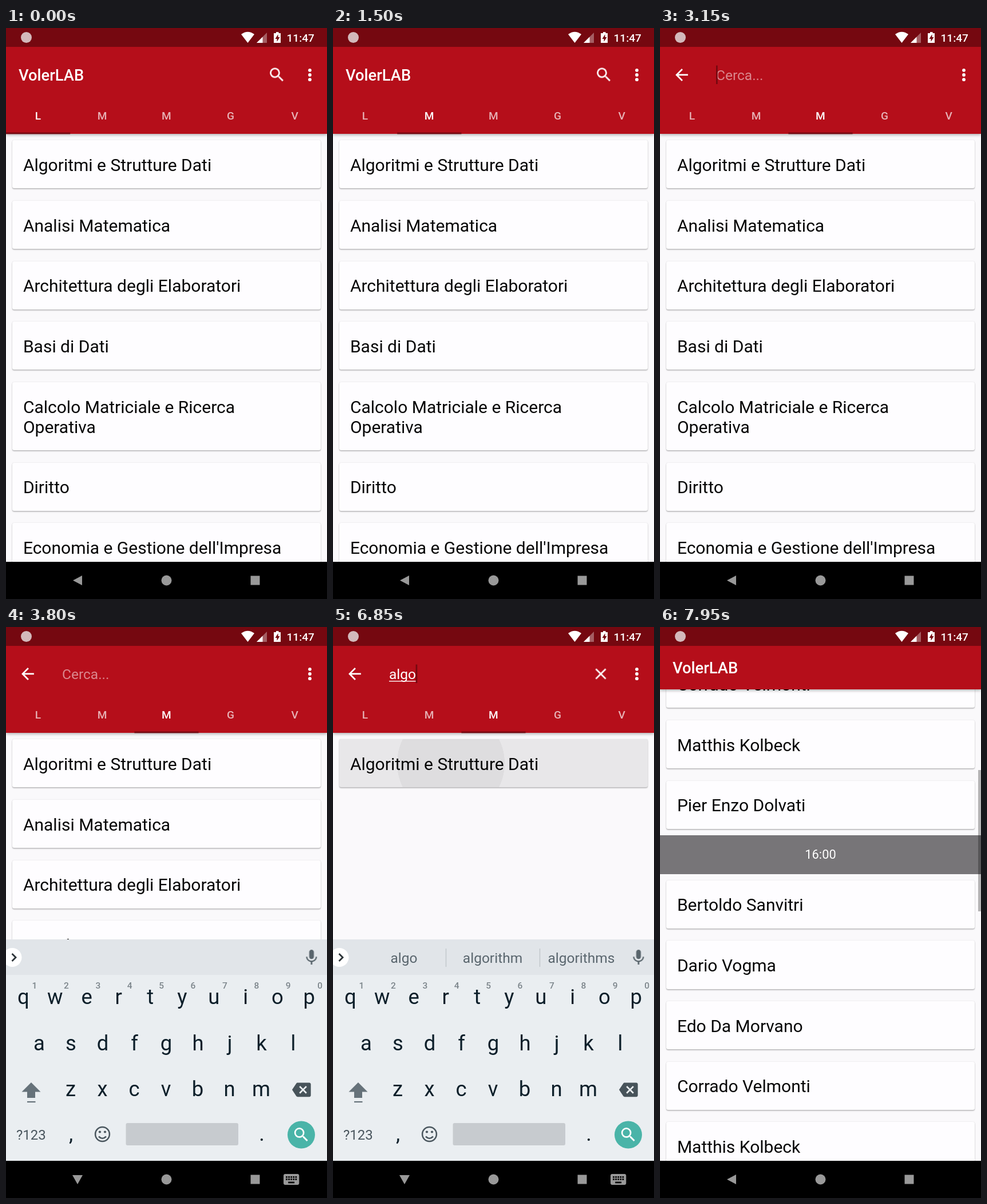
Animation, 561 px wide and 998 px high, one loop 8 s. Source, as an HTML page:

```html
<!DOCTYPE html>
<html lang="it">
<head>
<meta charset="utf-8">
<title>Ricevimento</title>
<style>
html, body { margin: 0; width: 100%; height: 100%; overflow: hidden; background: #faf9fb; }
#stage { position: relative; width: 561px; height: 998px; overflow: hidden; font-family: Roboto, sans-serif; }
#stage > *, .layer { position: absolute; left: 0; top: 0; }
svg { display: block; }
.view { overflow: hidden; width: 561px; background: #faf9fb; }
.mid { text-anchor: middle; }
.med { font-weight: 500; }

.card {
  position: relative; box-sizing: border-box; width: 539.2px; margin: 0 0 21.6px 10.9px;
  padding: 25.7px 19px 23.2px; border-radius: 3px; background: #fefdff; color: #060606;
  font-size: 30px; line-height: 35.2px; white-space: pre;
  box-shadow: 0 1.6px 2px rgba(0,0,0,.27), 0 0 1.6px rgba(0,0,0,.16);
}
.band {
  height: 68.2px; margin-bottom: 10.9px; background: #777578; color: #fff;
  font-size: 21.8px; line-height: 68.2px; text-align: center;
}

#home { top: 185px !important; height: 748px; }
#pager { width: 1683px; display: flex; --to: -561px; animation: page 8s infinite; }
.page { width: 561px; padding-top: 11.2px; }
#mark { --to: 112.2px; animation: page 8s infinite; }
@keyframes page {
  0%, 10.625% { transform: none; animation-timing-function: cubic-bezier(.35,.2,.2,1); }
  18.75%, 23.125% { transform: translateX(var(--to)); animation-timing-function: cubic-bezier(.35,.2,.2,1); }
  30%, 100% { transform: translateX(calc(var(--to) * 2)); }
}

/* filtering on the third page */
.page:last-child .card { animation: drop 8s linear infinite; }
.page:last-child .card:nth-child(1) { animation: none; }
.page:last-child .card:nth-child(2) { animation: ghost 8s linear infinite; }
.page:last-child .card:nth-child(5) { animation: ghost 8s linear infinite, rise 8s infinite; }
@keyframes drop { 0%, 56.25% { opacity: 1; } 57.5%, 100% { opacity: 0; } }
@keyframes ghost {
  0%, 58.75% { opacity: 1; }
  60.625%, 85.6% { opacity: .045; }
  85.625%, 100% { opacity: 0; }
}
@keyframes rise { 0%, 56.875% { transform: none; } 58.75%, 100% { transform: translateY(-211.4px); } }

.press { width: 100%; height: 100%; overflow: hidden; border-radius: 3px; background: rgba(0,0,0,.085); }
.press i {
  position: absolute; left: 101px; top: -52px; width: 188px; height: 188px; border-radius: 50%;
  background: rgba(0,0,0,.048); animation: ripple 8s step-end infinite;
}
@keyframes ripple {
  0% { transform: scale(0); }
  80% { transform: scale(.35); }
  83.125% { transform: scale(.64); }
  85.625% { transform: none; }
  86.25% { transform: scale(1.6); }
  86.875%, 100% { transform: scale(2.6); }
}

#keys { top: 546px !important; }
#board { animation: board 8s infinite; }
@keyframes board {
  0%, 43.125% { transform: translateY(260px); opacity: 0; animation-timing-function: ease-out; }
  45%, 85.75% { transform: none; opacity: 1; animation-timing-function: ease-in; }
  87.5%, 100% { transform: translateY(260px); opacity: 0; }
}

#detail { top: 33px !important; height: 900px; animation: open 8s infinite; }
@keyframes open {
  0%, 86% { transform: translateY(70px); opacity: 0; animation-timing-function: ease-out; }
  88.125%, 100% { transform: none; opacity: 1; }
}
#slots { top: 76.2px; width: 561px; animation: scroll 8s linear infinite; }
@keyframes scroll {
  0%, 94.9% { transform: none; }
  95% { transform: translateY(-17px); animation-timing-function: cubic-bezier(.4,.25,.6,.9); }
  99.375%, 100% { transform: translateY(-448px); }
}
#thumb {
  left: 555.5px; width: 5.5px; background: rgba(0,0,0,.28);
  animation: thumb 8s linear infinite;
}
@keyframes thumb {
  0%, 94.9% { top: 81px; height: 0; }
  95% { top: 81px; height: 258px; animation-timing-function: cubic-bezier(.4,.25,.6,.9); }
  99.375%, 100% { top: 217px; height: 247px; }
}
.bar { background: #b50e1a; width: 561px; box-shadow: 0 2px 5px rgba(0,0,0,.3); }
</style>
</head>
<body>
<div id="stage">
  <div id="home" class="view"><div id="pager"></div></div>

  <div class="bar" style="top:33px;height:152.4px"></div>
  <svg id="head" width="561" height="186" fill="#fff">
    <defs>
      <path id="find" d="M15.5 14h-.79l-.28-.27A6.47 6.47 0 0 0 16 9.5 6.5 6.5 0 1 0 9.5 16c1.61 0 3.09-.59 4.23-1.57l.27.28v.79l5 4.99L20.49 19l-4.99-5zm-6 0C7.01 14 5 11.99 5 9.5S7.01 5 9.5 5 14 7.01 14 9.5 11.99 14 9.5 14z"/>
    </defs>
    <g data-on="0 3150">
      <text class="med" x="22" y="92.3" font-size="27.3">VolerLAB</text>
      <use href="#find" transform="translate(457 65.4) scale(1.364)"/>
    </g>
    <g data-on="3150 8000">
      <path transform="translate(21.6 65.6) scale(1.364)" d="M20 11H7.83l5.59-5.59L12 4l-8 8 8 8 1.41-1.41L7.83 13H20z"/>
      <text data-on="3150 4450" x="98" y="91" font-size="24.5" fill-opacity=".5">Cerca...</text>
      <rect data-on="3150 3600" x="98" y="65.5" width="2.7" height="32.5" fill="#750810"/>
      <path data-on="4450 8000" transform="translate(451.6 65.6) scale(1.364)" d="M19 6.41L17.59 5 12 10.59 6.41 5 5 6.41 10.59 12 5 17.59 6.41 19 12 13.41 17.59 19 19 17.59 13.41 12z"/>
      <g id="typed" font-size="24.5"></g>
    </g>
    <circle cx="531" cy="73.8" r="2.9"/><circle cx="531" cy="82" r="2.9"/><circle cx="531" cy="90.2" r="2.9"/>
    <g id="tabs" class="mid med" font-size="19.1"></g>
    <rect id="mark" y="182.6" width="112.2" height="2.8" fill="#750810"/>
  </svg>

  <div id="detail" class="view">
    <div id="slots" class="layer"></div>
    <div id="thumb" class="layer"></div>
    <div class="bar layer" style="height:76.2px"></div>
    <svg class="layer" width="561" height="76" fill="#fff"><text class="med" x="22" y="48.3" font-size="27.3">VolerLAB</text></svg>
  </div>

  <svg id="keys" width="561" height="387" viewBox="0 546 561 387">
    <g id="board">
      <rect y="546" width="561" height="387" fill="#eaeef1"/>
      <rect y="546" width="561" height="62" fill="#e1e5e9"/>
      <g data-on="3800 8000">
        <circle cx="11" cy="577.5" r="16.5" fill="#fff"/>
        <path d="M10.5 571l6.5 6.5-6.5 6.5" fill="none" stroke="#2c3438" stroke-width="2.8"/>
        <path transform="translate(517.6 561.3) scale(1.364)" fill="#59656c" d="M12 14c1.66 0 3-1.34 3-3V5c0-1.66-1.34-3-3-3S9 3.34 9 5v6c0 1.66 1.34 3 3 3zm5.3-3c0 3-2.54 5.1-5.3 5.1S6.7 14 6.7 11H5c0 3.41 2.72 6.23 6 6.72V21h2v-3.28c3.28-.48 6-3.3 6-6.72z"/>
      </g>
      <path data-on="4450 8000" d="M197.5 562v32M361.5 562v32" stroke="#c0c6ca" stroke-width="1.4"/>
      <g id="hints" class="mid" font-size="24.5" fill="#5a666e"></g>
      <g id="letters" class="mid" font-size="36.5" fill="#0d1f2a"></g>
      <g id="digits" class="mid med" font-size="15.5" fill="#7b848a"></g>
      <path d="M44 796l16.500 16.500h-9.500v10.500h-14v-10.500h-9.500z" fill="#66727a"/>
      <path d="M37 830h14.500" stroke="#66727a" stroke-width="2.200"/>
      <path transform="translate(500 792.500) scale(1.364)" fill="#47535a" d="M22 3H7c-.69 0-1.230.350-1.590.880L0 12l5.410 8.110c.360.530.900.890 1.590.890h15c1.100 0 2-.900 2-2V5c0-1.100-.900-2-2-2zm-3 12.590L17.590 17 14 13.410 10.410 17 9 15.590 12.590 12 9 8.410 10.410 7 14 10.590 17.590 7 19 8.410 15.410 12z"/>
      <text x="18" y="896" font-size="24" fill="#4a565e">?123</text>
      <g fill="none" stroke="#4a565e" stroke-width="2.500">
        <circle cx="168.500" cy="886.500" r="12.400"/>
        <path d="M162 890.500q6.500 6.500 13 0"/>
      </g>
      <circle cx="164" cy="882.500" r="2.100" fill="#4a565e"/><circle cx="173" cy="882.500" r="2.100" fill="#4a565e"/>
      <rect x="209.500" y="867" width="196.500" height="39" rx="3" fill="#c7cbcf"/>
      <circle cx="516" cy="887.500" r="24" fill="#4ab4a8"/>
      <use href="#find" transform="translate(499.700 871) scale(1.364)" fill="#fff"/>
    </g>
  </svg>

  <svg width="561" height="998">
    <rect width="561" height="33" fill="#750810"/>
    <circle cx="35.500" cy="16.500" r="9.500" fill="#d3b9bb"/>
    <g fill="#fff">
      <path d="M411 11Q422.500 2.500 434 11L422.500 26z"/>
      <path d="M438 26L456 8V26z" opacity=".35"/>
      <path d="M438 26L448.500 15.500V26z"/>
      <path d="M472 7h4.500v2h3.500v17h-12V9h4z"/>
      <text class="med" x="490.500" y="23.500" font-size="19.100">11:47</text>
    </g>
    <path d="M475.500 11l-5 8h3v5l5-8h-3z" fill="#750810"/>
    <rect y="933" width="561" height="65"/>
    <g fill="#999">
      <path data-on="0 3300 6950 8000" d="M117 965.500L133 957V974z"/>
      <g data-on="3300 6950">
        <path d="M116 958H134L125 974z"/>
        <path transform="translate(482.300 949.100) scale(1.364)" d="M20 5H4c-1.100 0-2 .900-2 2v10c0 1.100.900 2 2 2h16c1.100 0 2-.900 2-2V7c0-1.100-.900-2-2-2zm-9 3h2v2h-2V8zm0 3h2v2h-2v-2zM8 8h2v2H8V8zm0 3h2v2H8v-2zm-1 2H5v-2h2v2zm0-3H5V8h2v2zm9 7H8v-2h8v2zm0-4h-2v-2h2v2zm0-3h-2V8h2v2zm3 3h-2v-2h2v2zm0-3h-2V8h2v2z"/>
      </g>
      <circle cx="280.500" cy="965.500" r="9"/>
      <rect x="427.500" y="957.500" width="16" height="16"/>
    </g>
  </svg>
</div>

<script>
const $ = id => document.getElementById(id);
const card = (text, extra = '') => `<div class="card">${extra}${text}</div>`;
const label = (x, y, text) => `<text x="${x}" y="${y}">${text}</text>`;

// Course pages
const courses = ['Algoritmi e Strutture Dati', 'Analisi Matematica', 'Architettura degli Elaboratori',
  'Basi di Dati', 'Calcolo Matriciale e Ricerca\nOperativa', 'Diritto', "Economia e Gestione dell'Impresa"];
const press = '<div class="press layer" data-on="6400 8000"><i></i></div>';
$('pager').innerHTML = [0, 1, 2].map(p =>
  `<div class="page">${courses.map((c, i) => card(c, p === 2 && i === 0 ? press : '')).join('')}</div>`).join('');

// Teachers by hour
const people = ['Bertoldo Sanvitri', 'Dario Vogma', 'Edo Da Morvano',
  'Corrado Velmonti', 'Matthis Kolbeck', 'Pier Enzo Dolvati'];
$('slots').innerHTML = ['15:00', '16:00'].map(h =>
  // the last card of a block sits closer to the next band
  `<div style="height:702.5px"><div class="band">${h}</div>${people.map(n => card(n)).join('')}</div>`).join('');

// Tabs
const active = ['0 1200', '1200 2150', '2150 8000'];
$('tabs').innerHTML = [...'LMMGV'].map((c, i) =>
  `<text x="${56 + i * 112.2}" y="160.3" style="--off:.68;opacity:.68" ${active[i] ? `data-on="${active[i]}"` : ''}>${c}</text>`).join('');

// Typing: text, width, interval, cursor intervals, suggestions
const steps = [
  ['a', 13.3, '4450 4500', '4450 4500', ['a', 'and', 'at']],
  ['al', 19.3, '4500 4650', '4500 4650', ['al', 'all', 'also']],
  ['alg', 33, '4650 4800', '4650 4800', ['alg', 'algae', 'algebra']],
  ['algo', 47, '4800 8000', '4800 5700 6150 8000', ['algo', 'algorithm', 'algorithms']]
];
$('typed').innerHTML = steps.map(([text, w, on, blink]) => `<g data-on="${on}">${label(98, 91, text)}
  <rect x="98" y="94" width="${w}" height="1.4"/>
  <rect data-on="${blink}" x="${97.6 + w}" y="65.5" width="2.7" height="32.5" fill="#750810"/></g>`).join('');
$('hints').innerHTML = steps.map(([, , on, , words]) =>
  `<g data-on="${on}">${words.map((w, i) => label(124 + i * 155, 587, w)).join('')}</g>`).join('');

// Keyboard
const row = (keys, x, y) => [...keys].map((k, i) => label(x + i * 55.5, y, k)).join('');
$('letters').innerHTML = row('qwertyuiop', 30.3, 658.5) + row('asdfghjkl', 58, 739.5) +
  row('zxcvbnm', 113, 820) + label(113.5, 898, ',') + label(447, 898, '.');
$('digits').innerHTML = [...'1234567890'].map((d, i) => label(50 + i * 55.4, 632, d)).join('');

// data-on lists the on/off times in ms
const off = 'var(--off, 0)';
let css = '';
document.querySelectorAll('[data-on]').forEach((el, i) => {
  const cuts = el.dataset.on.split(' ').map(Number);
  css += `@keyframes on${i}{${cuts[0] ? `0%{opacity:${off}}` : ''}` +
    cuts.map((t, k) => `${t / 80}%{opacity:${k % 2 ? off : 1}}`).join('') + '}\n';
  el.style.animation = `on${i} 8s step-end infinite`;
});
document.head.appendChild(document.createElement('style')).textContent = css;
</script>
</body>
</html>
```
